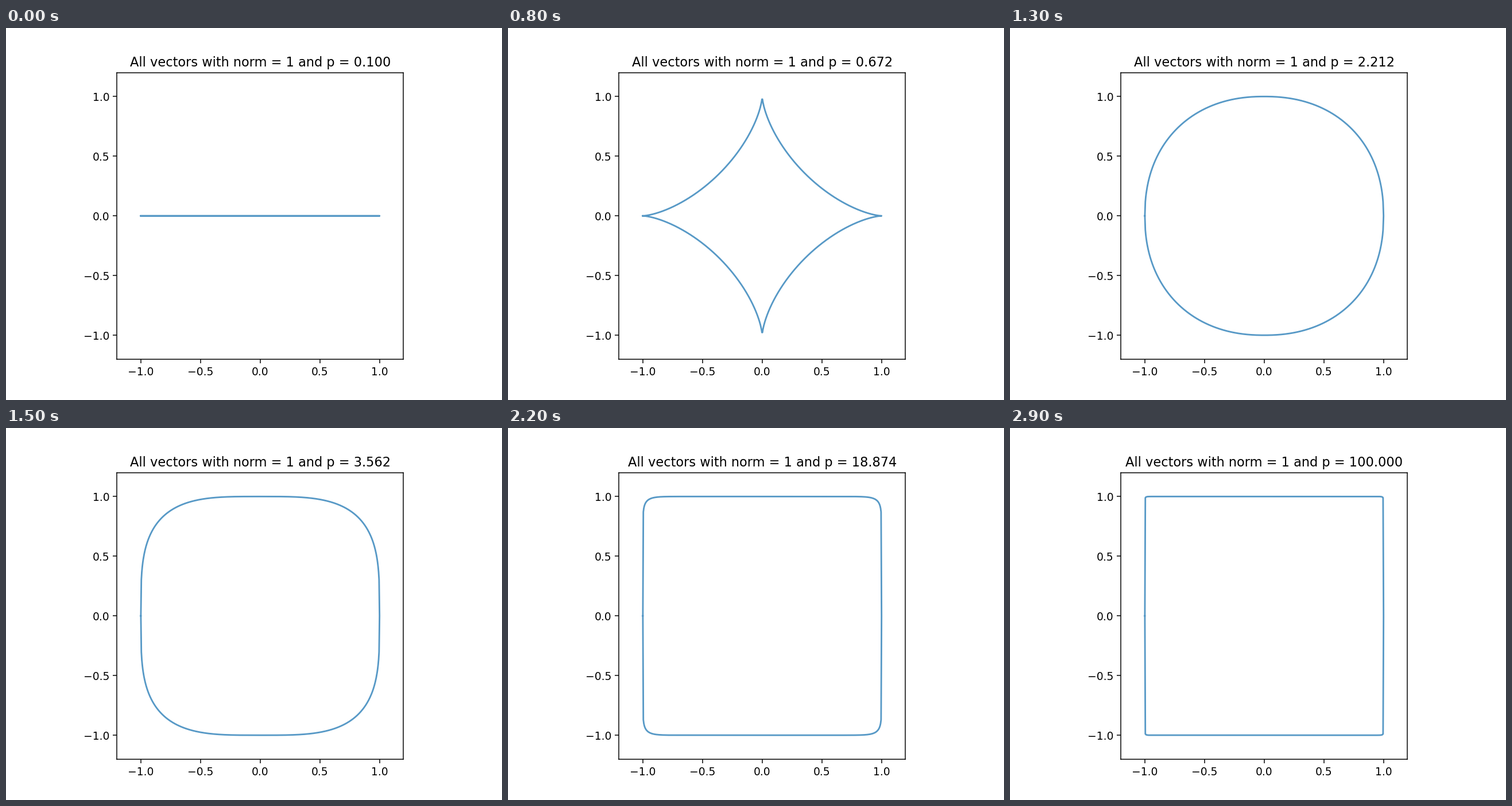
These frames come from a looping animation (864 px wide and 648 px high, 3 s). A matplotlib script:

```python
import numpy as np
import matplotlib.pyplot as plt
from matplotlib.animation import FuncAnimation

FRAMES = 30
POWERS = np.logspace(-1, 2, FRAMES)
X = np.linspace(-1, 1, 500)

plt.rcParams["font.family"] = "DejaVu Sans"
fig, ax = plt.subplots(figsize=(6.4, 4.8), dpi=135)
ax.set_aspect("equal")
ax.set_xlim(-1.2, 1.2)
ax.set_ylim(-1.2, 1.2)
ticks = np.arange(-1, 1.1, 0.5)
ax.set_xticks(ticks)
ax.set_yticks(ticks)
line, = ax.plot([], [], color="#1f77b4", lw=1.5, alpha=0.75)


def unit_ball(p):
    """Outline of |x|^p + |y|^p = 1, from the left tip over the top and back."""
    y = np.maximum(1 - np.abs(X) ** p, 0) ** (1 / p)
    return np.concatenate([X, X[::-1]]), np.concatenate([y, -y[::-1]])


def update(i):
    p = POWERS[i]
    line.set_data(*unit_ball(p))
    ax.set_title(f"All vectors with norm = 1 and p = {p:.3f}")
    return line,


anim = FuncAnimation(fig, update, frames=FRAMES, interval=100, repeat=True,
                     repeat_delay=0)
plt.show()
```
